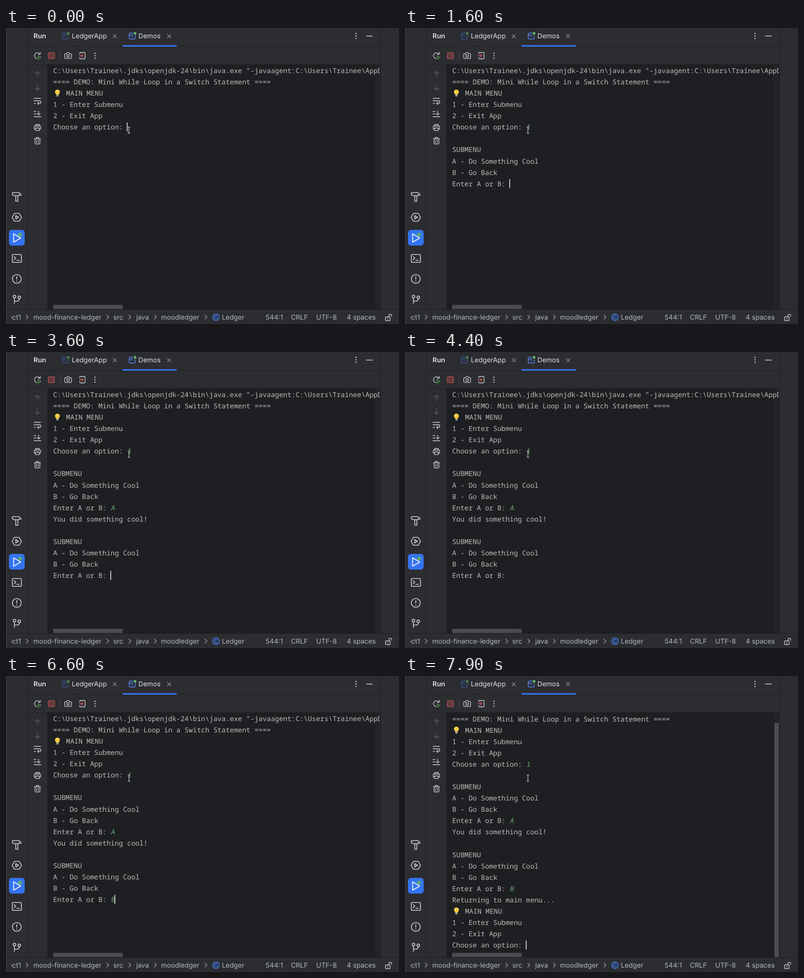
Write an HTML page that moves like this. It is 800 px wide and 604 px high and loops after 8000 ms.

```html
<!DOCTYPE html>
<html lang="en">
<head>
<meta charset="utf-8">
<title>Console menu demo</title>
<style>
  html, body { margin: 0; width: 100%; height: 100%; overflow: hidden; background: #2b2d30; }
  svg { display: block; width: 800px; height: 604px; }
  text { text-rendering: geometricPrecision; white-space: pre; }
  .ui { font: 13.7px Inter, sans-serif; fill: #dfe1e5; }
  .status { fill: #b4b8bf; }
  .mono { font: 500 13.95px "Noto Sans Mono", "DejaVu Sans Mono", monospace; fill: #c0bbb5; }
  .input { fill: #6aab73; }
  .icon { fill: none; stroke: #ced0d6; stroke-width: 1.3; stroke-linecap: round; stroke-linejoin: round; }
  .big { stroke-width: 1.6; }
  .dim { stroke: #5a5d63; }
  .soft { stroke: #868a91; }
  .dots { fill: #ced0d6; stroke: none; }
  .green { fill: #5fad65; stroke: none; }
</style>
</head>
<body>
<svg viewBox="0 0 800 604">
  <defs>
    <clipPath id="consoleClip"><rect x="84" y="75" width="677" height="499"/></clipPath>
    <clipPath id="crumbClip"><rect x="11" y="576" width="60" height="28"/></clipPath>
    <g id="window">
      <path d="M8 1H2.5Q.7 1 .7 2.8V11.2Q.7 13 2.5 13H11.5Q13.3 13 13.3 11.2V6M.7 5H8"/>
      <path d="M3.6 8h.1M6.4 8h.1M9.2 8h.1" stroke-width="1.5"/>
    </g>
    <path id="cross" d="M-3.5-3.5 3.5 3.5M3.5-3.5-3.5 3.5"/>
    <path id="chevron" d="M-2-4 2.2 0-2 4"/>
    <path id="pointer" d="M247.5 202H249.3L250.2 203 251.1 202H253M250.2 203V214M247.5 215H249.3L250.2 214 251.1 215H253"/>
    <g id="kebab"><circle cy="-5" r="1.3"/><circle r="1.3"/><circle cy="5" r="1.3"/></g>
    <g id="bulb">
      <path d="M-2.6 2.2C-2.8.4-5-.8-5-3.2A5 5 0 0 1 5-3.2C5-.8 2.8.4 2.6 2.2Z" fill="#fccb3f"/>
      <path d="M-3-3.4A3 3 0 0 1-.6-6" fill="none" stroke="#fff1b0" stroke-width="1.2"/>
      <path d="M-2.4 2.4H2.4V4.6L1.2 6H-1.2L-2.4 4.6Z" fill="#9aa3a8"/>
    </g>
  </defs>

  <rect width="800" height="604" fill="#2b2d30"/>
  <path d="M.5 0V604" stroke="#434447"/>
  <path d="M43.5 0V574M762.5 0V574M44 37.5H762M44 74.5H762M1 574.5H800" stroke="#1e1f22"/>
  <rect x="84" y="75" width="678" height="499" fill="#1e1f22"/>
  <rect x="751" y="75" width="11" height="499" fill="#232427"/>

  <!-- tabs -->
  <g class="ui">
    <text x="56" y="21" font-weight="600">Run</text>
    <text x="134" y="21">LedgerApp</text>
    <text x="269.5" y="21">Demos</text>
  </g>
  <g class="icon">
    <use href="#window" x="114" y="9.5" stroke="#3a5796"/>
    <use href="#window" x="250" y="9.5" stroke="#548af7"/>
    <circle class="green" cx="126.5" cy="11" r="2.9" opacity=".6"/>
    <circle class="green" cx="262.7" cy="11" r="2.9"/>
    <use href="#cross" x="221.5" y="16.8" class="soft"/>
    <use href="#cross" x="332" y="16.8" class="soft"/>
    <path d="M733.5 16.5H746"/>
  </g>
  <rect x="237" y="35" width="110.5" height="3" fill="#3574f0"/>
  <g class="dots">
    <use href="#kebab" x="712.5" y="16"/>
    <use href="#kebab" x="181" y="56.5"/>
  </g>

  <!-- toolbar -->
  <g class="icon">
    <path d="M63 62.4A5.9 5.9 0 1 1 68.4 52.8M69.8 49.6V53.7H65.6"/>
    <path d="M65.5 56.5 71.5 60 65.5 63.5Z" fill="#253627" stroke="#57965c"/>
    <rect x="86.2" y="50.3" width="12.4" height="12.4" rx="1.8" fill="#673a3b" stroke="#b65052"/>
    <path d="M110.5 46V67" stroke="#43454a"/>
    <path d="M121 52.5H123.4L124.8 50.4H128.4L129.8 52.5H132Q133.5 52.5 133.5 54V60.7Q133.5 62.2 132 62.2H121Q119.5 62.2 119.5 60.7V54Q119.5 52.5 121 52.5Z"/>
    <circle cx="126.5" cy="57" r="2.6"/>
    <path d="M150 53V51.5Q150 50 151.5 50H159.5Q161 50 161 51.5V61.5Q161 63 159.5 63H151.5Q150 63 150 61.5V60"/>
    <path d="M149 56.5H156.6M154 53.6 157 56.5 154 59.4" stroke="#db5c5c"/>
  </g>

  <!-- console actions -->
  <g class="icon">
    <path class="dim" d="M64 100V88.4M59.4 93 64 88.4 68.6 93M64 115.5V127M59.4 122.5 64 127 68.6 122.5"/>
    <path d="M57 143.5H70.5M57 148.5H68.2A2.7 2.7 0 0 1 68.2 153.9H64.4M66.5 151.5 64.2 153.9 66.5 156.2M57 153.9H60.5"/>
    <path d="M57 170.5H61M57 175.5H61M57 181H71M66.5 169.5V177.5M63.2 174.4 66.5 177.6 69.8 174.4"/>
    <path d="M60.2 200V197H67.8V200M60.2 206.5H58.8Q57.5 206.5 57.5 205.2V201.4Q57.5 200 58.8 200H69.2Q70.5 200 70.5 201.4V205.2Q70.5 206.5 69.2 206.5H67.8M60.2 204H67.8V209.3H60.2Z"/>
    <path d="M57.8 226H70.2M61.6 225.8V223.3H66.4V225.8M59 226.2V235Q59 236.5 60.5 236.5H67.5Q69 236.5 69 235V226.2M62.2 229V233.5M65.8 229V233.5"/>
  </g>

  <!-- tool windows -->
  <rect x="6" y="412" width="32" height="32" rx="6" fill="#3574f0"/>
  <g class="icon big">
    <path d="M13 336H24.5Q29 336 30.8 341.2L26.5 340.2V342.2H17.5L13 340.5ZM19.8 342.2V353.5H24.2V342.2"/>
    <path d="M17.2 378.3H26.8L31.6 386.3 26.8 394.3H17.2L12.4 386.3ZM19.8 382.8V389.8L25.6 386.3Z"/>
    <path d="M15.5 420V437L30 428.5Z" stroke="#fff"/>
    <circle class="green" cx="28.5" cy="421.5" r="3.7"/>
    <rect x="12.8" y="462.2" width="18.6" height="16" rx="2"/>
    <path d="M16.5 466.5 20 469.7 16.5 473M22 474H27"/>
    <circle cx="22" cy="512" r="9"/>
    <path d="M22 507V512.8"/>
    <path d="M22 516.5v.1" stroke-width="2.1"/>
    <circle cx="17.2" cy="548" r="2.7"/>
    <circle cx="27" cy="549.6" r="2.7"/>
    <path d="M17.2 550.8V562M27 552.4Q27 557.3 22 557.3H17.2"/>
  </g>

  <!-- status bar -->
  <g class="ui status">
    <text x="30.5" y="595" text-anchor="end" clip-path="url(#crumbClip)">ect1</text>
    <text x="55.5" y="595">mood-finance-ledger</text>
    <text x="218.5" y="595">src</text>
    <text x="265" y="595">java</text>
    <text x="315.5" y="595">moodledger</text>
    <text x="439.5" y="595">Ledger</text>
    <text x="528.5" y="595">544:1</text>
    <text x="580" y="595">CRLF</text>
    <text x="631.5" y="595">UTF-8</text>
    <text x="693.5" y="595">4 spaces</text>
  </g>
  <g class="icon">
    <g stroke="#9da0a8">
      <use href="#chevron" x="43" y="590"/>
      <use href="#chevron" x="207" y="590"/>
      <use href="#chevron" x="252" y="590"/>
      <use href="#chevron" x="304" y="590"/>
      <use href="#chevron" x="407" y="590"/>
    </g>
    <circle cx="427.5" cy="590" r="6.8" fill="#25324d" stroke="#548af7"/>
    <path d="M430 587.8A3.3 3.3 0 1 0 430 592.2" stroke="#548af7"/>
    <rect x="772.5" y="589.5" width="9.5" height="7.5" rx="1.3"/>
    <path d="M779.5 589.5V587A2.8 2.8 0 0 1 785.1 587V588.5M777.2 592.5V594"/>
  </g>

  <!-- console -->
  <g clip-path="url(#consoleClip)"><g id="session" class="mono"></g></g>
  <rect x="96" y="565" width="141.5" height="8.5" fill="#4b4c4e"/>
  <rect id="scrollbar" x="752" y="96" width="9" height="477.5" fill="#4b4c4e"/>
  <rect id="caret" width="1.8" height="18.5" fill="#ced0d6"/>
  <g fill="none">
    <use href="#pointer" stroke="#111" stroke-width="2" opacity=".5"/>
    <use href="#pointer" stroke="#e4e4e4" stroke-width="1.1"/>
  </g>
</svg>
<script>
const LOOP = 8000, BLINK = 500;
const LEFT = 96, BASELINE = 92, LINE = 23.07, CHAR = 8.37, SCROLL = 22.4;

const mainMenu = ["MAIN MENU", "1 - Enter Submenu", "2 - Exit App", "Choose an option: "];
const submenu = ["", "SUBMENU", "A - Do Something Cool", "B - Go Back", "Enter A or B: "];
const lines = [
  String.raw`C:\Users\Trainee\.jdks\openjdk-24\bin\java.exe "-javaagent:C:\Users\Trainee\AppData`,
  "==== DEMO: Mini While Loop in a Switch Statement ====",
  ...mainMenu, ...submenu,
  "You did something cool!", ...submenu,
  "Returning to main menu...", ...mainMenu
];
const answers = { 5: "1", 10: "A", 16: "B" };

// Each key press restarts the caret's blink.
const steps = [
  { at: 0, last: 5, typed: false },
  { at: 700, last: 5, typed: true },
  { at: 1300, last: 10, typed: false },
  { at: 3000, last: 10, typed: true },
  { at: 3500, last: 16, typed: false },
  { at: 6300, last: 16, typed: true },
  { at: 6900, last: 21, typed: false }
];

const session = document.getElementById("session");
const caret = document.getElementById("caret");
const scrollbar = document.getElementById("scrollbar");

function add(tag, attrs, content = "") {
  const node = document.createElementNS("http://www.w3.org/2000/svg", tag);
  for (const name in attrs) node.setAttribute(name, attrs[name]);
  node.textContent = content;
  return session.appendChild(node);
}

// Typed answers lean less than the browser's synthetic italic.
function addInput(x, y, content) {
  return add("text", { class: "input", transform: `translate(${x} ${y}) skewX(-9)` }, content);
}

const show = (node, visible) => node.setAttribute("visibility", visible ? "visible" : "hidden");

const rows = lines.map((line, i) => {
  const y = BASELINE + i * LINE;
  const isTitle = line === "MAIN MENU";
  const output = [add("text", { x: isTitle ? 122.3 : LEFT, y }, line)];
  if (isTitle) output.push(add("use", { href: "#bulb", x: 104.7, y: y - 4.3 }));
  const input = answers[i] && addInput(LEFT + line.length * CHAR, y, answers[i]);
  return { output, input };
});

function draw(time) {
  const step = steps.findLast(s => s.at <= time);
  const { last, typed } = step;
  rows.forEach(({ output, input }, i) => {
    output.forEach(node => show(node, i <= last));
    if (input) show(input, i < last || (i === last && typed));
  });

  const scrolled = last === lines.length - 1;
  const offset = scrolled ? SCROLL : 0;
  session.setAttribute("transform", `translate(0 ${-offset})`);
  show(scrollbar, scrolled);

  caret.setAttribute("x", LEFT + (lines[last].length + typed) * CHAR - 0.9);
  caret.setAttribute("y", BASELINE + last * LINE - offset - 14.5);
  show(caret, Math.floor((time - step.at) / BLINK) % 2 === 0);
}

const start = performance.now();
function tick() {
  draw((performance.now() - start) % LOOP);
  requestAnimationFrame(tick);
}
tick();
</script>
</body>
</html>
```
